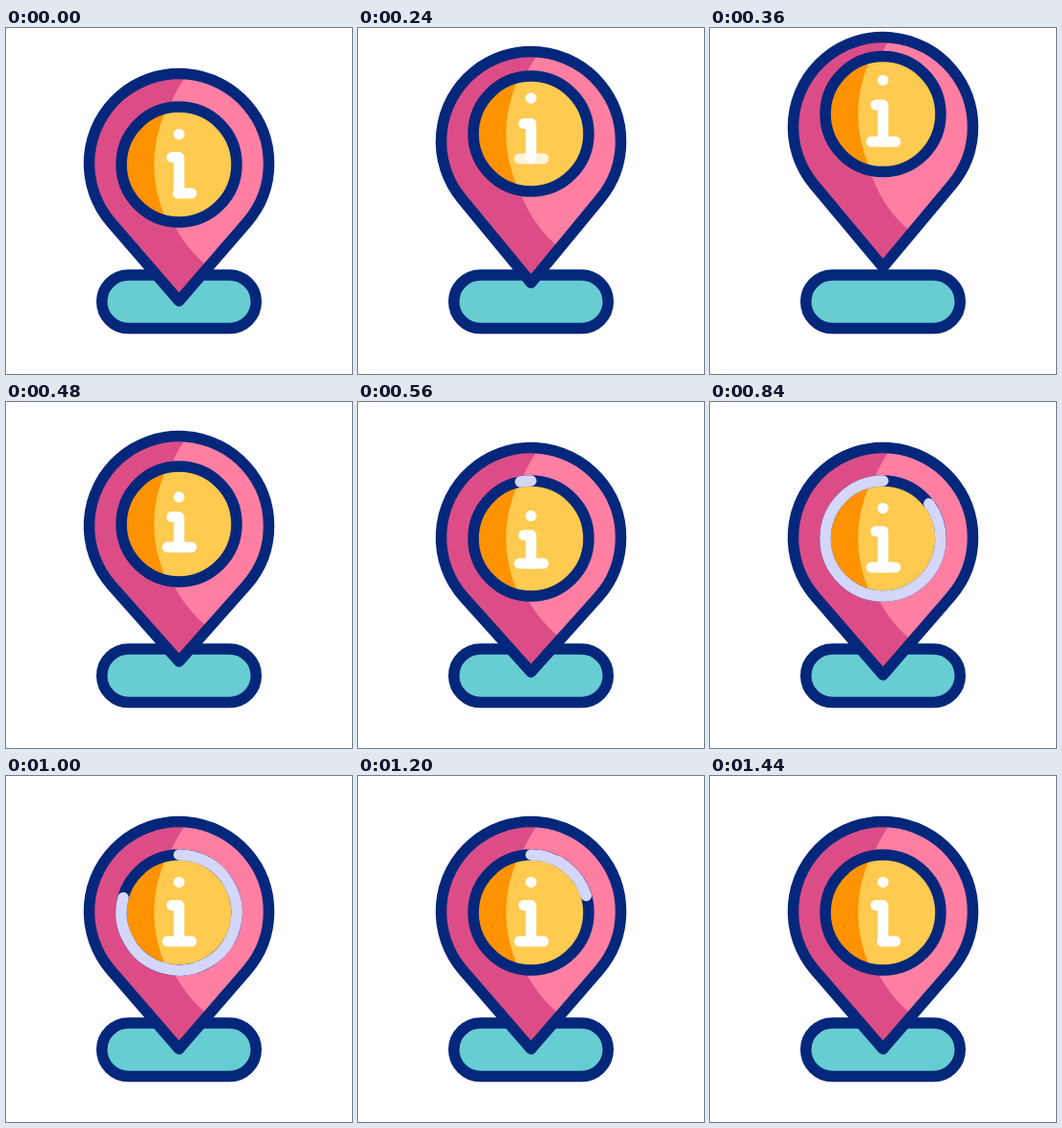
These frames come from a looping animation (360x360 px, 1480 ms). An HTML page with a canvas:

```html
<!DOCTYPE html>
<html lang="en">
<head>
<meta charset="utf-8">
<title>Information point</title>
<style>
  html, body { margin: 0; width: 100%; height: 100%; overflow: hidden; background: #fff; }
  canvas { display: block; width: 360px; height: 360px; }
</style>
</head>
<body>
<canvas id="stage"></canvas>
<script>
const LOOP = 1480, STEP = 40, LINE = 11.5, TAU = Math.PI * 2;
const NAVY = '#04277b', TEAL = '#68cdd2', ROSE = '#dc4d87', PINK = '#ff7fa3',
      ORANGE = '#ff9200', YELLOW = '#ffca50', LILAC = '#d4d6fa';

// Vertical offsets of each part during the hop, one value per key time
const TIMES = [120, 240, 340, 480, 560, 680, 840];
const TRACKS = {
  top:   [0, -23, -39, -12, 0, 9, 0],
  tip:   [0, -19, -36, -14, -3, 0, 0],
  ring:  [0, -32, -54, -15, 0, 14, 0],
  dot:   [0, -37.5, -58, -11.5, 8, 24.5, 0],
  serif: [0, -35, -56, -15, 4, 17.5, 0],
  foot:  [0, -36, -55, -21, -4, 12, 0],
  base:  [0, 0, 0, 0, 0, 11, 0]
};

const canvas = document.getElementById('stage');
const ctx = canvas.getContext('2d');
const dpr = window.devicePixelRatio || 1;
canvas.width = canvas.height = 360 * dpr;
ctx.scale(dpr, dpr);
ctx.lineCap = ctx.lineJoin = 'round';

const clamp = v => Math.min(1, Math.max(0, v));
const ramp = (t, from, to) => clamp((t - from) / (to - from));

// Slope at a key: flat at the ends and at turning points
function slope(v, i) {
  if (i === 0 || i === v.length - 1) return 0;
  if ((v[i] - v[i - 1]) * (v[i + 1] - v[i]) <= 0) return 0;
  return (v[i + 1] - v[i - 1]) / (TIMES[i + 1] - TIMES[i - 1]);
}

function sample(v, t) {
  const last = TIMES.length - 1;
  if (t <= TIMES[0]) return v[0];
  if (t >= TIMES[last]) return v[last];
  let i = 0;
  while (t >= TIMES[i + 1]) i++;
  const d = TIMES[i + 1] - TIMES[i], u = (t - TIMES[i]) / d, w = 1 - u;
  return w * w * (1 + 2 * u) * v[i] + u * u * (3 - 2 * u) * v[i + 1]
    + d * u * w * (w * slope(v, i) - u * slope(v, i + 1));
}

function stroke(path, color, width = LINE) {
  ctx.strokeStyle = color;
  ctx.lineWidth = width;
  ctx.stroke(path);
}

function fill(path, color) {
  ctx.fillStyle = color;
  ctx.fill(path);
}

function circle(x, y, r) {
  const p = new Path2D();
  p.arc(x, y, r, 0, TAU);
  return p;
}

// Two-tone shape: `light` covers the part of `shape` inside `region`
function twoTone(shape, region, dark, light) {
  fill(shape, dark);
  ctx.save();
  ctx.clip(shape);
  fill(region, light);
  ctx.restore();
}

function drawBase(grow) {
  const left = 99.75 - grow, right = 260.25 + grow, r = 27.75, y = 284.75;
  const p = new Path2D();
  p.arc(left + r, y, r, Math.PI / 2, Math.PI * 1.5);
  p.arc(right - r, y, r, -Math.PI / 2, Math.PI / 2);
  p.closePath();
  fill(p, TEAL);
  stroke(p, NAVY);
}

function drawPin(top, tip) {
  const r = 93.5, cy = 141 + top, end = 284 + tip;
  const a = Math.asin(r / (end - cy));
  const p = new Path2D();
  p.moveTo(180, end);
  p.arc(180, cy, r, Math.PI - a, TAU + a);
  p.closePath();
  const light = new Path2D(
    `M187 ${50 + top}C145 ${110 + top} 150 ${200 + tip} 210 ${248 + tip}H300V${20 + top}H187Z`);
  twoTone(p, light, ROSE, PINK);
  stroke(p, NAVY);
}

function drawRing(y, head, tail) {
  const disc = circle(180, y, 60);
  const light = new Path2D(
    `M166 ${y - 56}Q142 ${y} 166 ${y + 56}H250V${y - 60}H166Z`);
  twoTone(disc, light, ORANGE, YELLOW);
  stroke(disc, NAVY);
  if (head <= tail) return;
  const p = new Path2D(), start = -Math.PI / 2;
  p.arc(180, y, 60, start - tail * TAU, start - head * TAU, true);
  stroke(p, LILAC);
}

function drawLetter(t, dot, serif, foot) {
  fill(circle(180, 110.5 + dot, 5.7), '#fff');
  const y = 172 + foot;
  const stem = new Path2D(`M172.5 ${134.5 + serif}H180V${y}`);
  stroke(stem, '#fff', 11);
  const cut = t < 120 ? 1 : t < 160 ? 0.5 : ramp(t, 1240, 1400);
  ctx.globalAlpha = t >= 160 && t < 320 ? 0.8 : 1;
  stroke(new Path2D(`M${168 + 11 * cut} ${y}H193`), '#fff', 11);
  ctx.globalAlpha = 1;
}

function draw(t) {
  const at = {};
  for (const name in TRACKS) at[name] = sample(TRACKS[name], t);
  ctx.fillStyle = '#fff';
  ctx.fillRect(0, 0, 360, 360);
  drawBase(at.base);
  drawPin(at.top, at.tip);
  drawRing(142 + at.ring, ramp(t, 550, 890), ramp(t, 929, 1269));
  drawLetter(t, at.dot, at.serif, at.foot);
}

const began = performance.now();
function tick() {
  const t = (performance.now() - began) % LOOP;
  draw(Math.floor(t / STEP) * STEP);
  requestAnimationFrame(tick);
}
tick();
</script>
</body>
</html>
```
